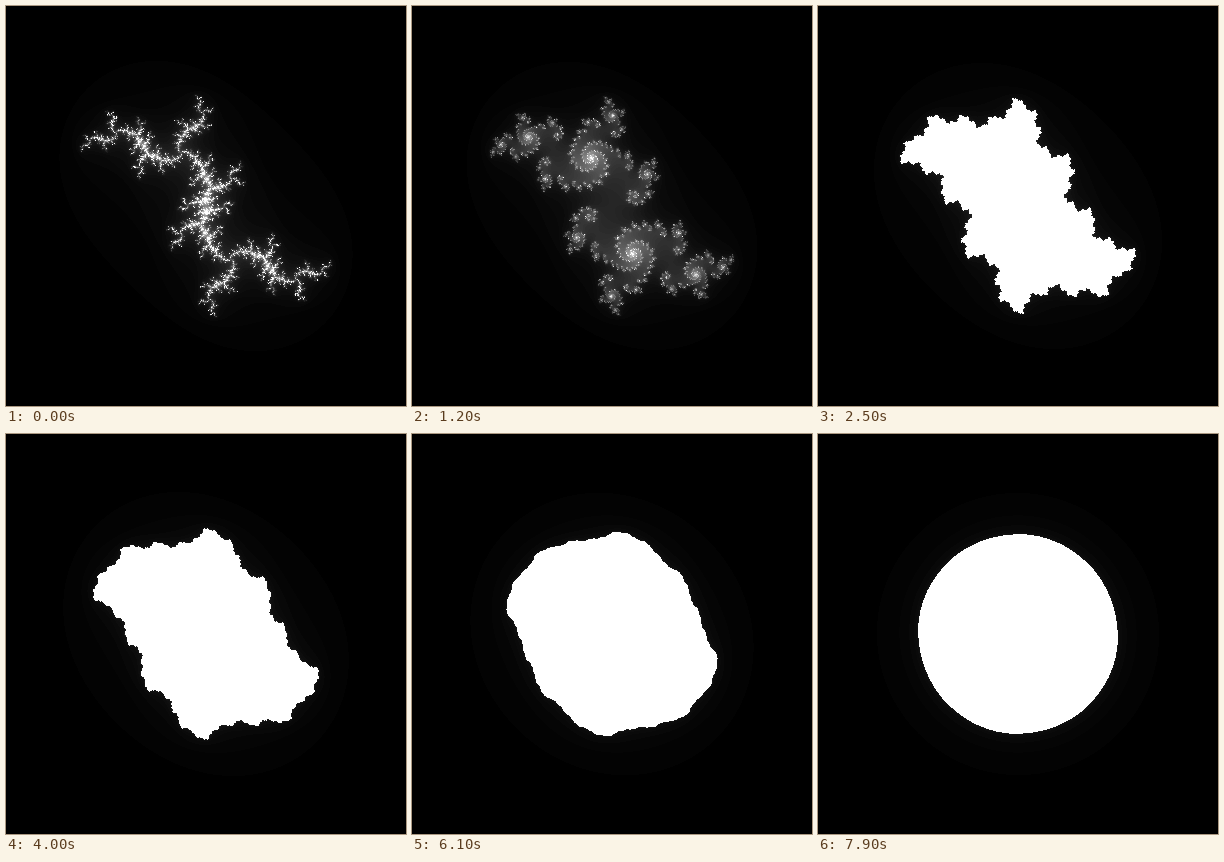
Recreate the animation shown at these times as an HTML page with a canvas. Size 400 px wide and 400 px high, loop 8 s.

```html
<!DOCTYPE html>
<html lang="en">
<head>
<meta charset="utf-8">
<title>Julia set</title>
<style>
html, body { margin: 0; width: 100%; height: 100%; overflow: hidden; background: #000; }
canvas { display: block; width: 400px; height: 400px; }
</style>
</head>
<body>
<canvas id="stage" width="400" height="400"></canvas>
<script>
const SIZE = 400, STEPS = 80, STEP_MS = 100, LIMIT = 100;
const RADIUS = 0.8, ANGLE = 1.6;
const ctx = document.getElementById('stage').getContext('2d');
const image = ctx.createImageData(SIZE, SIZE);
const pixels = new Uint32Array(image.data.buffer);

// Grey level for each escape count; the last entry is the filled set.
const shades = Array.from({ length: LIMIT + 1 }, (_, n) => {
  const v = Math.round(255 * n / LIMIT);
  return (0xff000000 | v << 16 | v << 8 | v) >>> 0;
});

const coord = i => -2 + 4 * i / (SIZE - 1);

function escapeCount(x, y, cr, ci) {
  for (let n = 0; n < LIMIT; n++) {
    const next = x * x - y * y + cr;
    y = 2 * x * y + ci;
    x = next;
    if (x * x + y * y > 4) return n;
  }
  return LIMIT;
}

// The set is symmetric about the centre, so half of it is computed.
function draw(step) {
  const r = RADIUS * (1 - step / STEPS);
  const cr = r * Math.cos(ANGLE), ci = r * Math.sin(ANGLE);
  const last = SIZE * SIZE - 1;
  for (let row = 0, p = 0; row < SIZE / 2; row++) {
    const y = -coord(row);
    for (let col = 0; col < SIZE; col++, p++) {
      pixels[p] = pixels[last - p] = shades[escapeCount(coord(col), y, cr, ci)];
    }
  }
  ctx.putImageData(image, 0, 0);
}

const start = performance.now();
let shown = -1;

function tick() {
  const elapsed = Math.max(0, performance.now() - start);
  const step = Math.floor(elapsed / STEP_MS) % STEPS;
  if (step !== shown) draw(shown = step);
  requestAnimationFrame(tick);
}
tick();
</script>
</body>
</html>
```
